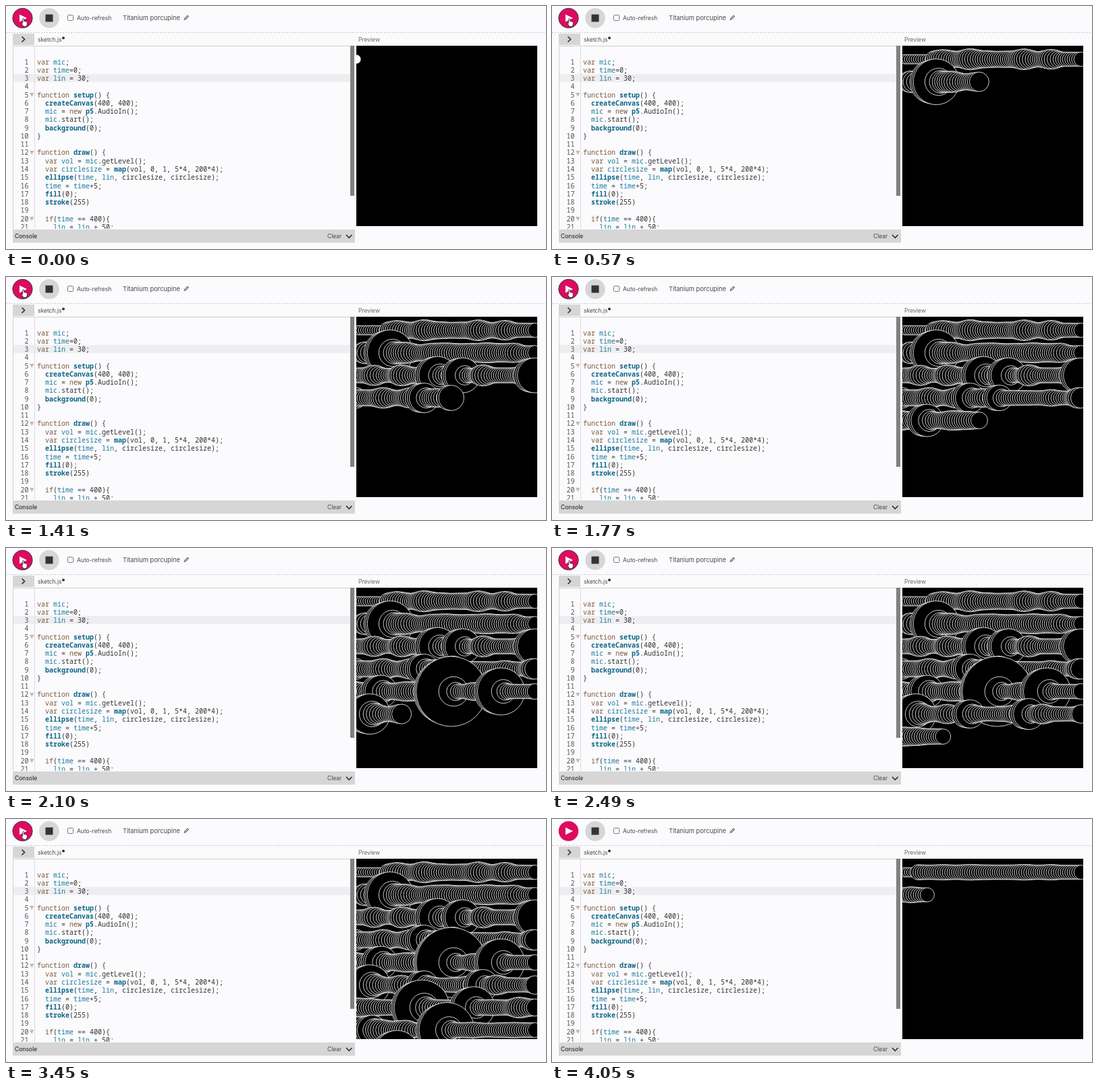
An HTML page with a canvas for the animation above (4.08 s loop, 800x361 px).

```html
<!DOCTYPE html>
<html lang="en">
<head>
<meta charset="utf-8">
<title>Sound sketch</title>
<style>
  html, body { margin: 0; width: 100%; height: 100%; overflow: hidden; background: #fbfafc; }
  svg { position: absolute; left: 0; top: 0; }
  canvas { position: absolute; left: 519px; top: 59px; background: #000; }
  text { font: 8.5px Inter, "Open Sans", sans-serif; fill: #4a4a4a; white-space: pre; }
  #code text { font: 10px "Noto Sans Mono", "DejaVu Sans Mono", monospace; fill: #333; }
  #code .num { fill: #555; text-anchor: end; }
  .key { fill: #7a5a3a; }
  .name { fill: #1a7a9c; }
  .func { fill: #0c6688; font-weight: 700; }
</style>
</head>
<body>
<svg width="800" height="361" viewBox="0 0 800 361">
  <path d="M0 39.5H800" stroke="#c8c8c8" stroke-dasharray="2 2"/>
  <circle id="play" cx="24.5" cy="18" r="14.7" fill="#de0a5f"/>
  <path d="M20 12.5L31 18L20 23.5Z" fill="#fff"/>
  <circle cx="64" cy="18" r="14.8" fill="#d6d6d6"/>
  <path d="M58.5 12.5h11v11h-11z" fill="#333"/>
  <rect x="91.5" y="13.5" width="8" height="8" rx="1" fill="#fff" stroke="#777"/>
  <text x="105" y="21">Auto-refresh</text>
  <text x="173" y="21" style="font-size:9.3px">Titanium porcupine</text>
  <path d="M264.3 20.2l.6-2 4-4 1.4 1.4-4 4z" fill="none" stroke="#555" stroke-width="1.1"/>

  <path d="M10 41h32v17h-32z" fill="#d6d6d6"/>
  <path d="M23.5 45.5l4 4-4 4" fill="none" stroke="#333" stroke-width="1.7"/>
  <text x="47" y="52.5">sketch.js</text>
  <circle cx="85" cy="47.5" r="2" fill="#333"/>
  <text x="522" y="52.5" style="fill:#666">Preview</text>

  <path d="M10 101h500v12h-500z" fill="#eeeef0"/>
  <path d="M10 59.5H517M10.5 59V331" fill="none" stroke="#d0d0d0"/>
  <path d="M42.5 60V331" stroke="#dcdcdc"/>
  <g id="code"></g>
  <path d="M510 59h6v223h-6z" fill="#808080"/>
  <path d="M0 331h518v30h-518z" fill="#fbfafc"/>
  <path d="M10 332h507v19.5h-507z" fill="#d6d6d6"/>
  <text x="13" y="345" style="fill:#333;font-weight:500">Console</text>
  <text x="476" y="345">Clear</text>
  <path d="M504 340l4.3 4.3 4.3-4.3" fill="none" stroke="#333" stroke-width="1.7"/>
  <path id="hand" d="M24.6 25.6V19.6q0-1.2 1-1.2t1 1.2v3.2q1-.7 1.7.2 1-.5 1.6.4 1.4-.4 1.4 1.2v2.6l-1.2 3.4h-4l-3.2-4.6q.4-1.3 1.7-.4z"
    fill="#fff" stroke="#222" stroke-width=".8"/>
</svg>
<canvas width="268" height="268"></canvas>
<script>
const source = `var mic;
var time=0;
var lin = 30;

function setup() {
  createCanvas(400, 400);
  mic = new p5.AudioIn();
  mic.start();
  background(0);
}

function draw() {
  var vol = mic.getLevel();
  var circlesize = map(vol, 0, 1, 5*4, 200*4);
  ellipse(time, lin, circlesize, circlesize);
  time = time+5;
  fill(0);
  stroke(255)

  if(time == 400){
    lin = lin + 50;`;
const $ = id => document.getElementById(id);
const tokens = /\b(?:(var|function|new|if)|(setup|createCanvas|p5|background|draw|map|ellipse|fill|stroke)|(mic|time|lin|(?:vol|circlesize)(?= =)))\b/g;
const color = line => line.replace(tokens, (word, key, func) =>
  `<tspan class="${key ? 'key' : func ? 'func' : 'name'}">${word}</tspan>`);

$('code').innerHTML = source.split('\n').map((line, i) => {
  const y = 86.5 + i * 12.27;
  const fold = line.endsWith('{') ? `<path d="M35 ${y - 6.5}h6.5l-3.2 6z" fill="#bbb"/>` : '';
  return `<text class="num" x="33.5" y="${y}">${i + 1}</text>${fold}<text x="46" y="${y}">${color(line)}</text>`;
}).join('');

// Microphone: a murmur of smooth noise, plus a few loud sounds [step, radius]
const firstTake = {
  quiet: 14, swell: 6,
  sounds: [[95, 34], [196, 28], [207, 26], [239, 26], [270, 22], [283, 19], [331, 24], [362, 52],
    [384, 35], [406, 30], [430, 21], [456, 23], [509, 41], [532, 31], [567, 22], [600, 41], [658, 33]]
};
const secondTake = { quiet: 7, swell: 1.5, sounds: [] };

function random(seed) {
  const v = Math.sin(seed * 127.1 + 3) * 43758.5;
  return v - Math.floor(v);
}

function noise(x) {
  const i = Math.floor(x), t = x - i, ease = t * t * (3 - 2 * t);
  return random(i) + (random(i + 1) - random(i)) * ease;
}

// A sound starts abruptly, swells a little, then dies away within a few steps
function gain(age) {
  if (age > 0) return Math.exp(-1.4 * age);
  return age > -3 ? 1 + 0.04 * age : 0;
}

function radius(take, n) {
  const base = n < take.quiet ? 7 : 10.5 + take.swell * noise(n / 6) ** 2;
  return Math.max(base, ...take.sounds.map(([at, peak]) => base + (peak - base) * gain(n - at)));
}

const ctx = document.querySelector('canvas').getContext('2d');
const SIZE = 268, SCALE = SIZE / 400, ROW_STEPS = 80;

function paint(take, last) {
  ctx.fillStyle = '#000';
  ctx.fillRect(0, 0, SIZE, SIZE);
  ctx.lineWidth = 0.8;
  for (let n = 0; n <= last; n++) {
    const row = Math.floor(n / ROW_STEPS), step = n % ROW_STEPS;
    ctx.beginPath();
    ctx.arc(step * 5 * SCALE, (30 + row * 50) * SCALE, radius(take, n), 0, Math.PI * 2);
    ctx.fillStyle = n ? '#000' : '#fff';
    ctx.strokeStyle = n ? '#fff' : '#000';
    ctx.fill();
    ctx.stroke();
  }
}

const LOOP = 4080, TICK = 30, RESTART = 120, HOLD = 115;
let shown = -1;

function frame() {
  const tick = Math.floor(performance.now() % LOOP / TICK);
  if (tick !== shown) {
    shown = tick;
    if (tick >= RESTART) paint(secondTake, (tick - RESTART) * 6 + 1);
    else paint(firstTake, Math.min(tick, HOLD) * 6);
    // The pointer leaves through the top after the restart
    const away = Math.min(1, Math.max(0, (tick - 122) / 7));
    $('hand').setAttribute('transform', `translate(0 ${-34 * away * away})`);
    $('play').setAttribute('stroke', away < 0.8 ? '#33475a' : 'none');
  }
  requestAnimationFrame(frame);
}
frame();
</script>
</body>
</html>
```
